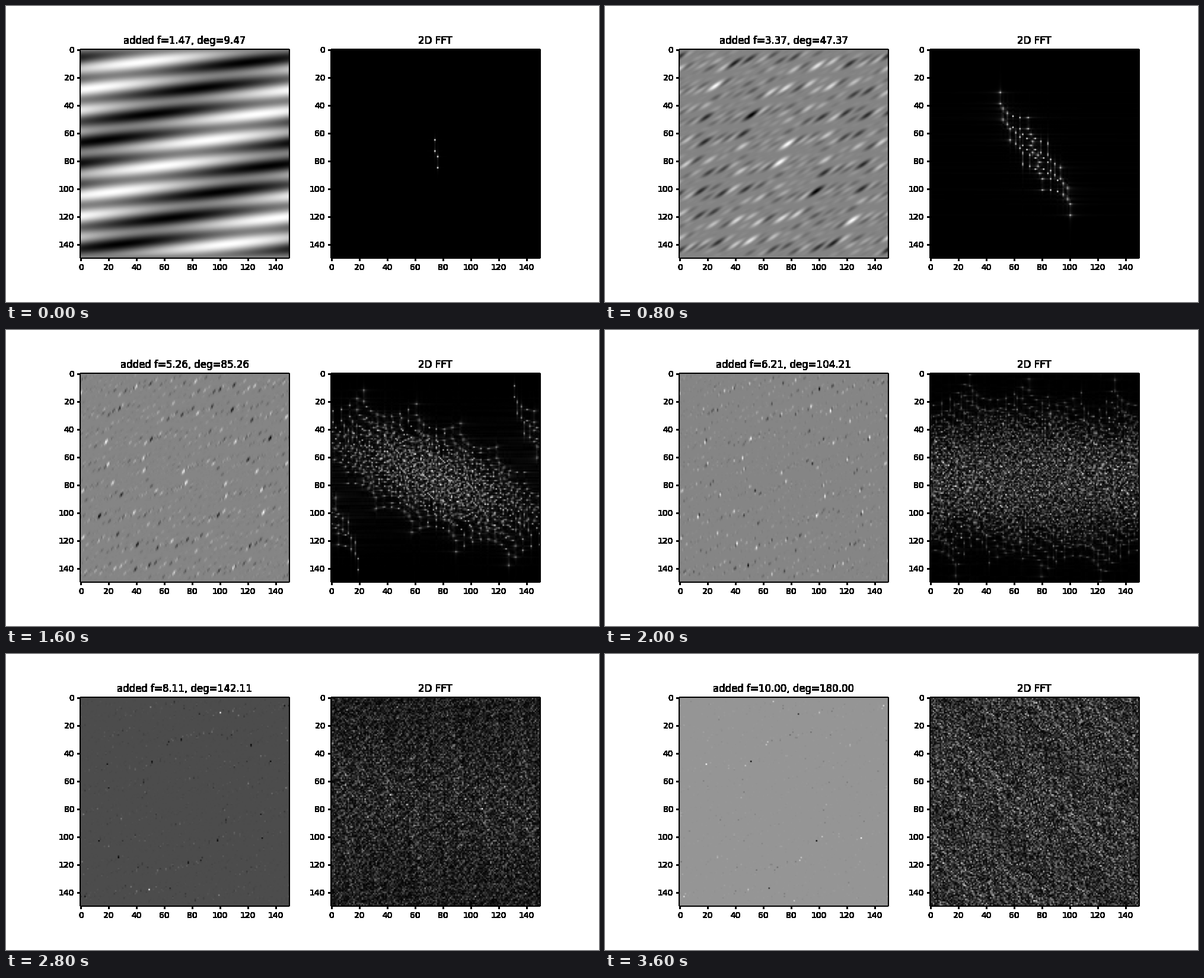
A matplotlib script for the animation above (3.8 s loop, 1000x500 px).

```python
import numpy as np
import matplotlib.pyplot as plt
from matplotlib.animation import FuncAnimation

SIZE = 150
STEPS = 20
INTERVAL = 200

plt.rcParams["font.family"] = "DejaVu Sans"
plt.rcParams["font.size"] = 10

freqs = np.linspace(1, 10, STEPS)
degs = np.linspace(0, 180, STEPS)
axis = np.linspace(-4 * np.pi, 4 * np.pi, SIZE)
X, Y = np.meshgrid(axis, axis)


def wave(freq, deg):
    angle = np.deg2rad(deg)
    return np.sin(freq * (X * np.sin(angle) + Y * np.cos(angle)))


def spectrum(img):
    return np.abs(np.fft.fftshift(np.fft.fft2(img)))


def solid(img, dpi):
    """Make every touched pixel opaque, for hard-edged text and lines."""
    out = img.copy()
    out[..., 3] = np.where(img[..., 3] > 0, 1.0, 0.0)
    return out, 0, 0


def harden(ax):
    # The patch edge sits under the image, so only its outer side shows.
    ax.patch.set(edgecolor="black", linewidth=0.8)
    for artist in (ax.patch, ax.xaxis, ax.yaxis, ax.title):
        artist.set_agg_filter(solid)


# Each pattern is the product of all the waves so far.
waves = np.array([wave(f, d) for f, d in zip(freqs, degs)])
patterns = np.cumprod(waves, axis=0)

fig, (left, right) = plt.subplots(1, 2, figsize=(10, 5), dpi=100,
                                  facecolor="white")
fig.subplots_adjust(left=0.125, right=0.9, bottom=0.125, top=0.88, wspace=0.2)

pattern_img = left.imshow(patterns[1], cmap="gray")
fft_img = right.imshow(spectrum(patterns[1]), cmap="gray")
right.set_title("2D FFT")
for ax in (left, right):
    harden(ax)


def show(img, data):
    img.set_data(data)
    img.autoscale()


def update(frame):
    step = frame + 1
    show(pattern_img, patterns[step])
    show(fft_img, spectrum(patterns[step]))
    left.set_title(f"added f={freqs[step]:.2f}, deg={degs[step]:.2f}")
    return pattern_img, fft_img, left.title


anim = FuncAnimation(fig, update, frames=STEPS - 1, interval=INTERVAL,
                     repeat=True, repeat_delay=0, blit=False)
plt.show()
```
